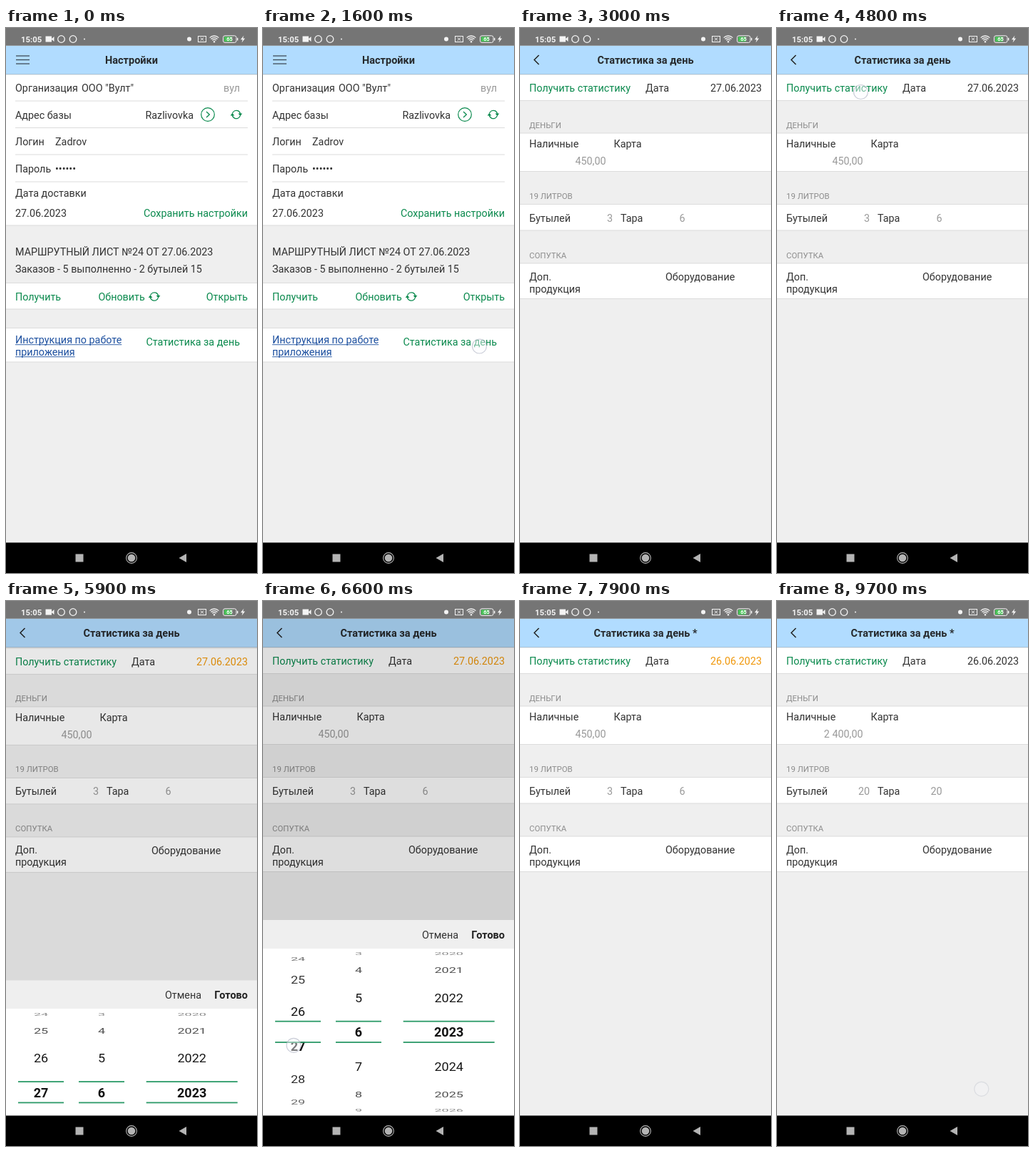
Animation of 352x762 px, one loop 9.8 s. Source, as an HTML page with a canvas:

```html
<!DOCTYPE html>
<html lang="ru">
<head>
<meta charset="utf-8">
<title>Статистика за день</title>
<style>
html, body { margin: 0; width: 100%; height: 100%; overflow: hidden; background: #efefef; }
canvas { display: block; width: 352px; height: 762px; }
</style>
</head>
<body>
<canvas id="stage"></canvas>
<script>
const W = 352, H = 762, LOOP = 9800, STEP = 100;
const BAR = 24.7, TOP = 65, BOTTOM = 719.5;
const INK = '#333', GREEN = '#0b8a4e', GRAY = '#999', ORANGE = '#f0980c', BG = '#efefef', LINE = '#dcdcdc';
const FAMILY = 'Roboto, "Noto Sans", sans-serif';
const BODY = 14.34, HEAD = 14.5, SMALL = 11.4;

const canvas = document.getElementById('stage');
const ctx = canvas.getContext('2d');
const dpr = window.devicePixelRatio || 1;
canvas.width = W * dpr;
canvas.height = H * dpr;

const clamp = v => Math.max(0, Math.min(1, v));
const mix = (a, b, p) => a + (b - a) * p;

// CSS "ease": cubic-bezier(.25, .1, .25, 1)
function ease(x) {
  x = clamp(x);
  if (x === 0 || x === 1) return x;
  const bez = (a, b, u) => 3 * a * u * (1 - u) ** 2 + 3 * b * u * u * (1 - u) + u ** 3;
  let lo = 0, hi = 1;
  for (let i = 0; i < 24; i++) {
    const mid = (lo + hi) / 2;
    if (bez(.25, .25, mid) < x) lo = mid; else hi = mid;
  }
  return bez(.1, 1, lo);
}
const span = (t, start, length) => ease((t - start) / length);

// y is the middle of the capitals
function text(str, x, y, { color = INK, size = BODY, weight = 400, align = 'left' } = {}) {
  ctx.font = `${weight} ${size}px ${FAMILY}`;
  ctx.textAlign = align;
  ctx.fillStyle = color;
  ctx.fillText(str, x, y + size * .355);
}
const right = { align: 'right' };
const value = { align: 'right', color: GRAY };
const link = { color: GREEN };
const caption = { size: SMALL, color: '#8c8c8c' };

function rect(x, y, w, h, color) {
  ctx.fillStyle = color;
  ctx.fillRect(x, y, w, h);
}
function dot(x, y, r, color) {
  ctx.beginPath();
  ctx.arc(x, y, r, 0, 7);
  ctx.fillStyle = color;
  ctx.fill();
}
function ring(x, y, r, color, width) {
  ctx.beginPath();
  ctx.arc(x, y, r, 0, 7);
  ctx.strokeStyle = color;
  ctx.lineWidth = width;
  ctx.stroke();
}
function path(points, color, width) {
  ctx.beginPath();
  points.forEach(([x, y]) => ctx.lineTo(x, y));
  if (width) {
    ctx.strokeStyle = color;
    ctx.lineWidth = width;
    ctx.stroke();
  } else {
    ctx.fillStyle = color;
    ctx.fill();
  }
}
function faded(alpha, draw) {
  ctx.save();
  ctx.globalAlpha *= alpha;
  draw();
  ctx.restore();
}
function shifted(x, y, draw) {
  ctx.save();
  ctx.translate(x, y);
  draw();
  ctx.restore();
}

function cell(y0, y1) {
  rect(0, y0, W, y1 - y0, '#fff');
  rect(0, y0 - .5, W, 1, LINE);
  rect(0, y1 - .5, W, 1, LINE);
}

function refresh(x, y) {
  for (const turn of [0, Math.PI]) {
    shifted(x, y, () => {
      ctx.rotate(turn);
      ctx.beginPath();
      ctx.arc(0, 0, 5.7, Math.PI * 1.12, Math.PI * 1.95);
      ctx.strokeStyle = GREEN;
      ctx.lineWidth = 1.3;
      ctx.stroke();
      path([[2.7, -1.6], [8.3, -1.6], [5.6, 2.3]], GREEN);
    });
  }
}

function settings() {
  rect(0, TOP, W, BOTTOM - TOP, BG);
  cell(TOP, 276);
  for (const y of [102, 139.5, 177, 215]) rect(13, y - .5, 326, 1, LINE);
  text('Организация', 13, 84);
  text('ООО "Вулт"', 106, 84);
  text('вул', 328, 84, value);
  text('Адрес базы', 13, 121.5);
  text('Razlivovka', 263, 121.5, right);
  ring(283, 121, 9.3, GREEN, 1.2);
  path([[281, 117], [285.3, 121], [281, 125]], GREEN, 1.3);
  refresh(323, 121);
  text('Логин', 13, 159);
  text('Zadrov', 69, 159);
  text('Пароль', 13, 197);
  text('••••••', 69, 197);
  text('Дата доставки', 13, 231);
  text('27.06.2023', 13, 258.5);
  text('Сохранить настройки', 339, 258.5, { ...link, ...right });

  text('МАРШРУТНЫЙ ЛИСТ №24 ОТ 27.06.2023', 13, 313);
  text('Заказов - 5 выполненно - 2 бутылей 15', 13, 337);
  cell(356.5, 393);
  text('Получить', 13, 376, link);
  text('Обновить', 129.5, 376, link);
  refresh(208, 375.5);
  text('Открыть', 339, 376, { ...link, ...right });

  cell(419.5, 467);
  [['Инструкция по работе', 436], ['приложения', 453]].forEach(([str, y]) => {
    text(str, 13, y, { color: '#1c4f9f' });
    rect(13, y + 6.3, ctx.measureText(str).width, .9, '#1c4f9f');
  });
  text('Статистика за день', 328, 439, { ...link, ...right });
}

function stats(s) {
  rect(0, TOP, W, BOTTOM - TOP, BG);
  shifted(0, s.nudge, () => {
    cell(TOP, 101.5);
    faded(s.press, () => text('Получить статистику', 13, 84, link));
    text('Дата', 176, 84);
    text(s.date, 339, 84, { ...right, color: s.dateColor });
    text('ДЕНЬГИ', 13, 135.5, caption);
    cell(147, 200.5);
    text('Наличные', 13, 162);
    text('Карта', 131.5, 162);
    text(s.cash, 120.5, 186, value);
    text('19 ЛИТРОВ', 13, 234.5, caption);
    cell(246.5, 283);
    text('Бутылей', 13, 265.5);
    text(s.bottles, 130, 265.5, value);
    text('Тара', 141, 265.5);
    text(s.empties, 231.5, 265.5, value);
    text('СОПУТКА', 13, 317.5, caption);
    cell(329, 378.5);
    text('Доп.', 13, 347.5);
    text('продукция', 13, 364.5);
    text('Оборудование', 204, 348);
  });
}

function navbar(p, title) {
  const head = { size: HEAD, weight: 700, color: '#26292c', align: 'center' };
  rect(0, BAR, W, TOP - BAR, '#b1dcff');
  rect(0, TOP - 1, W, 1, '#a9c6dc');
  faded(1 - p, () => {
    for (const y of [39, 44.5, 50]) rect(14, y - .6, 19, 1.2, '#37424b');
    text('Настройки', 176 - 117 * p, 45, head);
  });
  if (p === 0) return;
  faded(p, () => {
    path([[26.5, 38], [20, 44.5], [26.5, 51]], '#222', 1.5);
    text(title, 176 + 243 * (1 - p), 45, head);
  });
}

function statusBar() {
  const ink = '#f4f4f4';
  rect(0, 0, W, BAR, '#757575');
  text('15:05', 21, 15.5, { size: 11.3, weight: 700, color: ink });
  rect(55.5, 11.5, 8.5, 8, ink);
  path([[64, 15], [67.5, 12], [67.5, 19], [64, 16]], ink);
  ring(77.5, 15.5, 4.8, ink, 1.3);
  ring(94, 15.5, 4.8, ink, 1.3);
  dot(110, 15.5, 1, ink);
  dot(257, 15.5, 3, ink);

  ctx.strokeStyle = ink;
  ctx.lineWidth = 1;
  ctx.strokeRect(269.5, 11.5, 11, 8);
  path([[273, 13.5], [277, 17.5]], ink, 1);
  path([[277, 13.5], [273, 17.5]], ink, 1);
  for (const r of [3.8, 6.4, 9]) {
    ctx.beginPath();
    ctx.arc(292, 20, r, Math.PI * 1.25, Math.PI * 1.75);
    ctx.lineWidth = 1.3;
    ctx.stroke();
  }
  dot(292, 19.3, 1.2, ink);

  ctx.beginPath();
  ctx.roundRect(304.5, 10.8, 18.5, 9.6, 2.5);
  ctx.lineWidth = 1;
  ctx.stroke();
  rect(306, 12.2, 11, 6.8, '#49c258');
  rect(324, 13.8, 1.4, 3.6, ink);
  text('65', 313.5, 15.6, { size: 7.5, weight: 700, color: '#fff', align: 'center' });
  path([[333.5, 10.5], [329, 16.2], [331.8, 16.2], [330.6, 20.5], [335.2, 14.6], [332.3, 14.6]], ink);
}

function systemBar() {
  const ink = '#b4b4b4';
  rect(0, BOTTOM, W, H - BOTTOM, '#000');
  rect(97.5, 735.5, 11, 11, ink);
  dot(176, 741, 5.3, ink);
  ring(176, 741, 7.4, ink, 1.1);
  path([[242.5, 741], [253, 735], [253, 747]], ink);
}

// Rows sit on a drum seen from the front
function drum(x, half, pos, first, last) {
  const radius = 112.7, angle = 25.2 * Math.PI / 180, mid = 603;
  for (let n = Math.max(first, Math.ceil(pos - 3.4)); n <= Math.min(last, pos + 3.4); n++) {
    const a = (n - pos) * angle;
    const far = Math.abs(n - pos);
    shifted(x, mid + radius * Math.sin(a), () => {
      ctx.scale(1, Math.cos(a));
      ctx.globalAlpha = clamp(1.22 - .24 * far);
      text(String(n), 0, 0, { size: 18, weight: far < .5 ? 700 : 400, color: '#111', align: 'center' });
    });
  }
  for (const y of [587.7, 617]) rect(x - half, y - .9, half * 2, 1.8, '#2c9a68');
}

function picker(open, day) {
  if (open === 0) return;
  rect(0, BAR, W, BOTTOM - BAR, `rgba(0,0,0,${.13 * open})`);
  shifted(0, 274 * (1 - open), () => {
    rect(0, 446, W, 39.5, '#efefef');
    rect(0, 485.5, W, 235, '#fff');
    text('Отмена', 274, 466.5, right);
    text('Готово', 339, 466.5, { ...right, size: HEAD, weight: 700, color: '#222' });
    drum(49, 32, day, 1, 30);
    drum(134, 32, 6, 1, 12);
    drum(260.7, 64, 2023, 1900, 2100);
  });
}

const touches = [
  { from: 1600, to: 1800, a: [303.5, 445] },
  { from: 3800, to: 4000, a: [125, 93], b: [129, 98] },
  { from: 4800, to: 5100, a: [117.5, 89.5] },
  { from: 5600, to: 5800, a: [303, 86] },
  { from: 6500, to: 6900, a: [43, 602], b: [43, 660] },
  { from: 7400, to: 7700, a: [326, 467] },
  { from: 8400, to: 8600, a: [117, 81] },
  { from: 9500, to: 9800, a: [286.8, 682.3] }
];

function touch(t) {
  for (const { from, to, a, b = a } of touches) {
    if (t < from || t >= to) continue;
    const p = (t - from) / (to - from - STEP);
    const x = mix(a[0], b[0], p), y = mix(a[1], b[1], p);
    faded(t >= to - STEP ? .5 : 1, () => {
      dot(x, y, 10, 'rgba(250,250,255,.45)');
      ring(x, y, 10, 'rgba(175,180,195,.65)', 1.2);
    });
  }
}

function pressed(t) {
  for (const start of [4900, 8500]) {
    if (t >= start && t < start + 200) return t < start + STEP ? .45 : .8;
  }
  return 1;
}

function draw(t) {
  const slide = span(t, 1858, 400);
  const open = span(t, 5778, 300) - span(t, 7600, 300);
  const day = 27 - span(t, 6450, 600);
  const loaded = t >= 8600;

  ctx.setTransform(dpr, 0, 0, dpr, 0, 0);
  ctx.clearRect(0, 0, W, H);
  if (slide < 1) {
    settings();
    rect(0, TOP, W, BOTTOM - TOP, `rgba(0,0,0,${.13 * slide})`);
  }
  if (slide > 0) {
    shifted(W * (1 - slide), 0, () => stats({
      nudge: t >= 5800 && t < 6000 ? .9 : 0,
      press: pressed(t),
      date: `${Math.round(day)}.06.2023`,
      dateColor: t >= 5800 && t < 8000 ? ORANGE : INK,
      cash: loaded ? '2 400,00' : '450,00',
      bottles: loaded ? '20' : '3',
      empties: loaded ? '20' : '6'
    }));
  }
  navbar(slide, t >= 7500 ? 'Статистика за день *' : 'Статистика за день');
  picker(open, day);
  touch(t);
  statusBar();
  systemBar();
}

// The screen refreshes ten times a second
const begin = performance.now();
function tick() {
  const t = Math.max(0, performance.now() - begin) % LOOP;
  draw(Math.floor(t / STEP) * STEP);
  requestAnimationFrame(tick);
}
tick();
</script>
</body>
</html>
```
